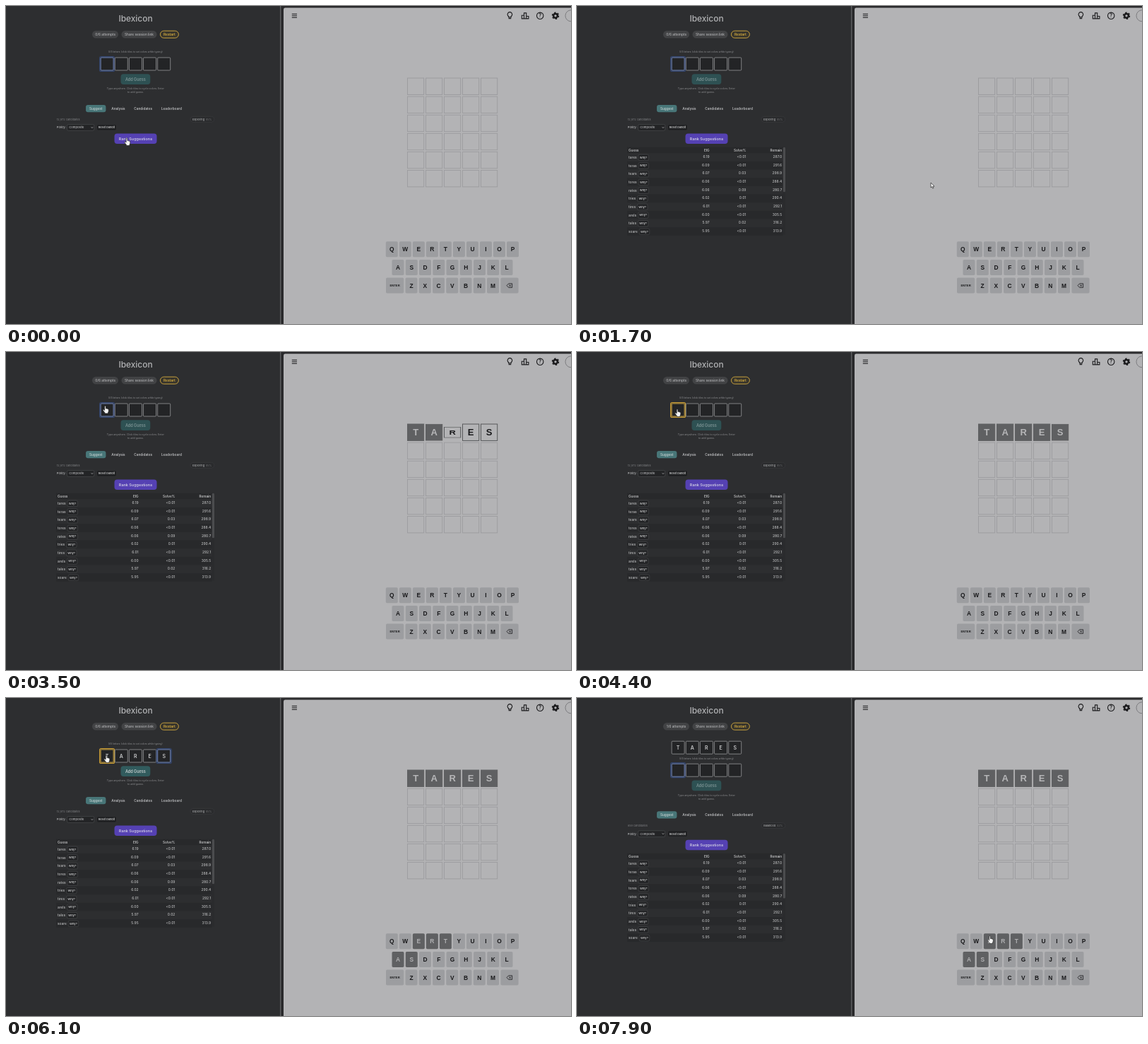
These frames come from a looping animation (800 px wide and 450 px high, 8 s). An HTML page:

```html
<!DOCTYPE html>
<html lang="en">
<head>
<meta charset="utf-8">
<title>Word helper session</title>
<style>
  html, body { margin: 0; width: 100%; height: 100%; overflow: hidden; background: #2d2e30; }
  svg { display: block; width: 100%; height: 100%; }
  text { font-family: Inter, "Noto Sans", sans-serif; white-space: pre; }
  .board { font-family: "Liberation Sans", Arial, sans-serif; font-weight: 700; }
</style>
</head>
<body>
<svg id="stage" viewBox="0 0 800 450"></svg>
<script>
const NS = 'http://www.w3.org/2000/svg';
const LOOP = 8000;
const WORD = 'TARES';
const stage = document.getElementById('stage');

function add(parent, tag, attrs = {}) {
  const node = document.createElementNS(NS, tag);
  for (const k in attrs) node.setAttribute(k, attrs[k]);
  parent.appendChild(node);
  return node;
}
const set = (node, attrs) => { for (const k in attrs) node.setAttribute(k, attrs[k]); };
const show = (node, on) => node.setAttribute('visibility', on ? 'visible' : 'hidden');
const group = (parent, attrs) => add(parent, 'g', attrs);
const rect = (p, x, y, width, height, fill, more = {}) =>
  add(p, 'rect', { x, y, width, height, fill, ...more });
// y is the middle of the capitals
function label(p, str, x, y, size, fill, more = {}) {
  const node = add(p, 'text', {
    x, y: y + size * 0.36, 'font-size': size, fill, 'text-anchor': 'middle', ...more
  });
  node.textContent = str;
  return node;
}
const START = { 'text-anchor': 'start' };
const END = { 'text-anchor': 'end' };
const MID = { 'font-weight': 500 };
const BOLD = { 'font-weight': 600 };

/* ---------- helper panel ---------- */
rect(stage, 0, 0, 389, 450, '#2d2e30');
const panel = group(stage);
label(panel, 'Ibexicon', 183.5, 18, 11.9, '#b2b3b5', MID);
rect(panel, 122, 35, 37, 10.4, '#424345', { rx: 5.2 });
const attempts = label(panel, '', 140.6, 40.2, 4.7, '#b2b3b5', MID);
rect(panel, 163.5, 35, 50, 10.4, '#424345', { rx: 5.2 });
label(panel, 'Share session link', 188.5, 40.2, 4.75, '#b2b3b5', MID);
rect(panel, 218.4, 35.2, 26, 10, '#38352c', { rx: 5, stroke: '#c6a03e', 'stroke-width': 1 });
label(panel, 'Restart', 231.4, 40.2, 4.8, '#d0a83f', BOLD);

function tile(p, i, y) {
  const x = 143.1 + 20.15 * i;
  return {
    ring: rect(p, x - 10.4, y - 10.4, 20.8, 20.8, 'none', { rx: 2, 'stroke-width': 1.4 }),
    box: rect(p, x - 9, y - 9, 18, 18, '#232426', { rx: 1, stroke: '#8b8c8e', 'stroke-width': 0.9 }),
    text: label(p, WORD[i], x, y, 7, '#c6c7c8', BOLD)
  };
}
const past = group(panel);
[...WORD].forEach((_, i) => tile(past, i, 70.2));

const body = group(panel);
const counter = label(body, '', 183.4, 65.2, 3.45, '#8e8f91');
const slots = [...WORD].map((_, i) => tile(body, i, 82));

const addBtn = rect(body, 162.5, 96.3, 41.8, 14.8, '#2e5153', { rx: 4 });
const addText = label(body, 'Add Guess', 183.4, 103.8, 5.5, '#7b9293', BOLD);
label(body, 'Type anywhere. Click tiles to cycle colors. Enter', 183.4, 117.2, 3.6, '#8a8b8d');
label(body, 'to add guess.', 183.4, 122.2, 3.6, '#8a8b8d');

rect(body, 113, 140, 28.4, 10.2, '#487678', { rx: 3 });
label(body, 'Suggest', 127.2, 145.2, 4.7, '#c9d3d3', MID);
label(body, 'Analysis', 159, 145.2, 4.7, '#b8b9bb', BOLD);
label(body, 'Candidates', 194.2, 145.2, 4.7, '#b8b9bb', BOLD);
label(body, 'Leaderboard', 234.4, 145.2, 4.7, '#b8b9bb', BOLD);

const count = label(body, '', 71.8, 160.4, 3.85, '#7d7e80', START);
rect(body, 261, 156.3, 33.8, 8, '#2a2b2d', { rx: 4, stroke: '#3b3c3e', 'stroke-width': 0.6 });
const mode = label(body, '', 281, 160.4, 3.8, '#a4a5a7', { ...END, ...MID });
const share = label(body, '', 291.3, 160.4, 3.8, '#68696b', END);

label(body, 'Policy:', 71.8, 172, 4.1, '#b8b9bb', { ...START, ...MID });
rect(body, 86.4, 167.6, 38.4, 8.8, '#232426', { rx: 2, stroke: '#4a4b4d', 'stroke-width': 0.7 });
label(body, 'Composite', 89.3, 172, 4.1, '#b8b9bb', { ...START, ...MID });
add(body, 'path', { d: 'M120.6 171.2l1.3 1.4 1.3-1.4', fill: 'none', stroke: '#c4c5c6', 'stroke-width': 0.7 });
rect(body, 128.4, 167.6, 28, 8.6, '#1f2022', { rx: 2, stroke: '#393a3c', 'stroke-width': 0.6 });
label(body, 'Reset bandit', 142.4, 172, 3.85, '#c0c1c2', BOLD);

rect(body, 153.5, 180.5, 60, 14.6, '#5541b3', { rx: 4 });
label(body, 'Rank Suggestions', 183.5, 187.9, 5.45, '#cbc8e0', BOLD);

const ROWS = `tares 6.19 <0.01 287.0
teras 6.09 <0.01 291.6
tears 6.07 0.03 298.9
tores 6.06 <0.01 288.4
rates 6.06 0.09 280.7
tries 6.02 0.01 290.4
tires 6.01 <0.01 292.1
arels 6.00 <0.01 305.5
tales 5.97 0.02 316.2
soare 5.95 <0.01 313.9`.split('\n').map(r => r.split(' '));
const COLS = [187.6, 239.4, 290.2];

const table = group(body);
rect(table, 71, 199.6, 220.5, 8.6, '#28292b');
label(table, 'Guess', 73, 204.1, 4.7, '#bcbdbe', { ...START, ...BOLD });
['EIG', 'Solve%', 'Remain'].forEach((h, i) =>
  label(table, h, COLS[i], 204.1, 4.7, '#bcbdbe', { ...END, ...BOLD }));
ROWS.forEach(([word, ...nums], r) => {
  const y = 214.4 + 11.66 * r;
  if (r % 2) rect(table, 71, y - 6.2, 220.5, 11.6, '#28292b');
  const name = label(table, word, 73, y, 4.8, '#bcbdbe', { ...START, ...MID });
  const x = 73 + name.getComputedTextLength() + 2.3;
  rect(table, x, y - 4.3, 14.6, 8.6, '#222325', { rx: 2, stroke: '#4c4d4f', 'stroke-width': 0.6 });
  label(table, 'Why?', x + 7.3, y, 3.9, '#c0c1c2', BOLD);
  nums.forEach((n, i) => label(table, n, COLS[i], y - 1.2, 4.9, '#bcbdbe', { ...END, ...MID }));
});
rect(table, 291.8, 199.6, 3.2, 124, '#2a2b2d');
rect(table, 291.8, 199.8, 3.2, 63.5, '#4b4c4e', { rx: 1.5 });

/* ---------- game page ---------- */
rect(stage, 388.3, 0, 1.2, 450, '#747577');
rect(stage, 389.5, 0, 411, 450, '#29292b');
add(stage, 'path', { d: 'M393 450V5q0-2.4 2.4-2.4H800V450z', fill: '#b3b3b5' });

const icons = group(stage, { fill: 'none', stroke: '#1b1b1d', 'stroke-width': 1.1 });
add(icons, 'path', { d: 'M404.8 11.3h7.2M404.8 13.8h7.2M404.8 16.3h7.2', 'stroke-width': 1 });
add(icons, 'path', { d: 'M711.6 15.9v-1.2a3.3 3.3 0 1 1 3.6 0v1.2zM711.6 17.6h3.6' });
add(icons, 'path', { d: 'M730.3 17.9v-4.6h3.2v4.6zM733.5 17.9v-8h3.2v8zM736.7 17.9v-3.4h3.2v3.4z' });
add(icons, 'circle', { cx: 756.2, cy: 13.8, r: 4.7 });
label(icons, '?', 756.2, 13.8, 7, '#1b1b1d', { stroke: 'none', 'font-weight': 600 });
add(icons, 'circle', { cx: 778, cy: 13.8, r: 2.9, 'stroke-width': 2.5 });
add(icons, 'circle', { cx: 778, cy: 13.8, r: 4.5, 'stroke-width': 1.5, 'stroke-dasharray': '2.36 2.35' });
add(icons, 'circle', { cx: 800, cy: 13.8, r: 8, stroke: '#77777a', 'stroke-width': 0.9 });

for (let r = 1; r < 6; r++)
  for (let c = 0; c < 5; c++)
    rect(stage, 568.5 + 26 * c, 102 + 26.1 * r, 23.2, 23.4, 'none', { stroke: '#9c9c9f', 'stroke-width': 0.9 });
const cells = [...WORD].map((ch, i) => {
  const x = 580.1 + 26 * i, g = group(stage);
  return {
    x, g,
    box: rect(g, -11.6, -11.7, 23.2, 23.4, 'none', { 'stroke-width': 1 }),
    text: label(g, ch, 0, 0, 13, '#19191b', { class: 'board' })
  };
});

const used = [];
function key(x, y, w, ch, size = 8.4) {
  const box = rect(stage, x - w / 2, y - 11, w, 22, '#9c9da0', { rx: 1.8 });
  if (!ch) return;
  const text = label(stage, ch, x, y, size, '#19191b', { class: 'board' });
  if (WORD.includes(ch)) used.push({ box, text });
}
[...'QWERTYUIOP'].forEach((c, i) => key(546.3 + 19.02 * i, 344.3, 17, c));
[...'ASDFGHJKL'].forEach((c, i) => key(555 + 19.25 * i, 370, 17, c));
[...'ZXCVBNM'].forEach((c, i) => key(574 + 19.25 * i, 395.6, 17, c));
key(550.6, 395.6, 25.2, 'ENTER', 4.2);
key(713, 395.6, 25.2);
add(stage, 'path', {
  d: 'M711.6 392.8h5v5.6h-5l-2.6-2.8zM712.2 394.2l2.8 2.8M715 394.2l-2.8 2.8',
  fill: 'none', stroke: '#19191b', 'stroke-width': 0.8
});

/* ---------- cursor ---------- */
const cursor = group(stage);
const skin = { fill: '#f4f4f4', stroke: '#111', 'stroke-width': 0.6, 'stroke-linejoin': 'round' };
const arrow = add(cursor, 'path', { ...skin, d: 'M0 0v7l1.6-1.4 1.1 2.5 1.2-.5-1.1-2.4h2.2z' });
const hand = add(cursor, 'path', {
  ...skin,
  d: 'M-.9.4Q0-.7.9.4V3.6q.9-.6 1.5.2.9-.4 1.3.4 1.1-.2 1.1.9V7q0 1.2-.8 2v1.4H-.6V9.4L-3.2 5.9q-.2-1.2 1-1L-.9 6z'
});
const PATH = [
  [0, 171, 187], [300, 171, 187], [900, 220, 249], [1100, 220, 249], [1700, 501, 250],
  [2800, 501, 250], [3400, 140.5, 76.5], [3700, 140.5, 76.5], [4100, 142, 81],
  [6300, 142, 81], [6800, 196.5, 97], [7250, 196.5, 97], [7800, 586, 334], [7900, 584.5, 337], [LOOP, 584.5, 337]
];
const HOT = [[153, 180, 214, 196], [133, 72, 234, 92], [162, 92, 205, 112], [538, 333, 726, 407]];

function place(t) {
  const i = PATH.findIndex((p, k) => k && t <= p[0]);
  const [t0, x0, y0] = PATH[i - 1], [t1, x1, y1] = PATH[i];
  const u = (t - t0) / (t1 - t0), s = u * u * (3 - 2 * u);
  return [x0 + (x1 - x0) * s, y0 + (y1 - y0) * s];
}

/* ---------- timeline ---------- */
const RANKED = 1000, TYPE = 1900, FLIP = 2730, KEYS = 4480;
const GOLD = [4200, 6200], SUBMIT = 7200;
const ENTRY = [5300, 5500, 5620, 5740, 5880];
const clamp = v => Math.min(1, Math.max(0, v));
const easeIn = u => Math.pow(u, 1.5);

function pop(u) {
  return u < 0.4 ? 0.8 + 0.75 * u : 1.1 - (u - 0.4) / 6;
}

function drawCells(t) {
  cells.forEach((c, i) => {
    const typed = clamp((t - TYPE - 100 * i) / 100);
    const f = (t - FLIP - 300 * i) / 250;
    const on = t >= TYPE + 100 * i, done = f >= 1;
    const size = on ? pop(typed) : 1;
    let tall = 1;
    if (f > 0 && f < 1) tall = Math.cos(easeIn(f) * Math.PI / 2);
    else if (f >= 1 && f < 2) tall = Math.sin(easeIn(f - 1) * Math.PI / 2);
    set(c.g, { transform: `translate(${c.x} 113.7) scale(${size} ${size * tall})` });
    set(c.box, { fill: done ? '#5f6062' : 'none', stroke: done ? '#5f6062' : on ? '#58595b' : '#9c9c9f' });
    set(c.text, { fill: done ? '#b6b6b8' : '#19191b' });
    show(c.text, on);
  });
}

function drawSlots(t, sent) {
  const n = sent ? 0 : ENTRY.filter(e => t >= e).length;
  const gold = t >= GOLD[0] && t < GOLD[1];
  const focus = Math.min(n, 4);
  slots.forEach((s, i) => {
    const marked = gold && i === 0;
    set(s.ring, { stroke: marked ? '#c79c35' : i === focus ? '#34466f' : 'none' });
    set(s.box, { stroke: marked ? '#d0a845' : i === focus ? '#7c93cc' : '#8b8c8e' });
    show(s.text, i < n);
  });
  counter.textContent = `${n}/5 letters (click tiles to set colors while typing)`;
  set(addBtn, { fill: n === 5 ? '#315b5d' : '#2e5153' });
  set(addText, { fill: n === 5 ? '#c3cccc' : '#7b9293' });
}

function draw(t) {
  const sent = t >= SUBMIT;
  show(table, t >= RANKED);
  show(past, sent);
  set(body, { transform: `translate(0 ${sent ? 20.2 : 0})` });
  attempts.textContent = `${sent ? 1 : 0}/6 attempts`;
  count.textContent = `${sent ? '659' : '12,972'} candidates`;
  mode.textContent = sent ? 'Balanced' : 'Exploring';
  share.textContent = sent ? '52%' : '85%';
  drawSlots(t, sent);
  drawCells(t);
  used.forEach(k => {
    set(k.box, { fill: t >= KEYS ? '#5f6062' : '#9c9da0' });
    set(k.text, { fill: t >= KEYS ? '#b0b0b2' : '#19191b' });
  });
  const [x, y] = place(t);
  const over = HOT.some(([a, b, c, d]) => x >= a && x <= c && y >= b && y <= d);
  set(cursor, { transform: `translate(${x} ${y})` });
  show(hand, over);
  show(arrow, !over);
}

const begin = performance.now();
function tick() {
  draw((performance.now() - begin) % LOOP);
  requestAnimationFrame(tick);
}
tick();
</script>
</body>
</html>
```
